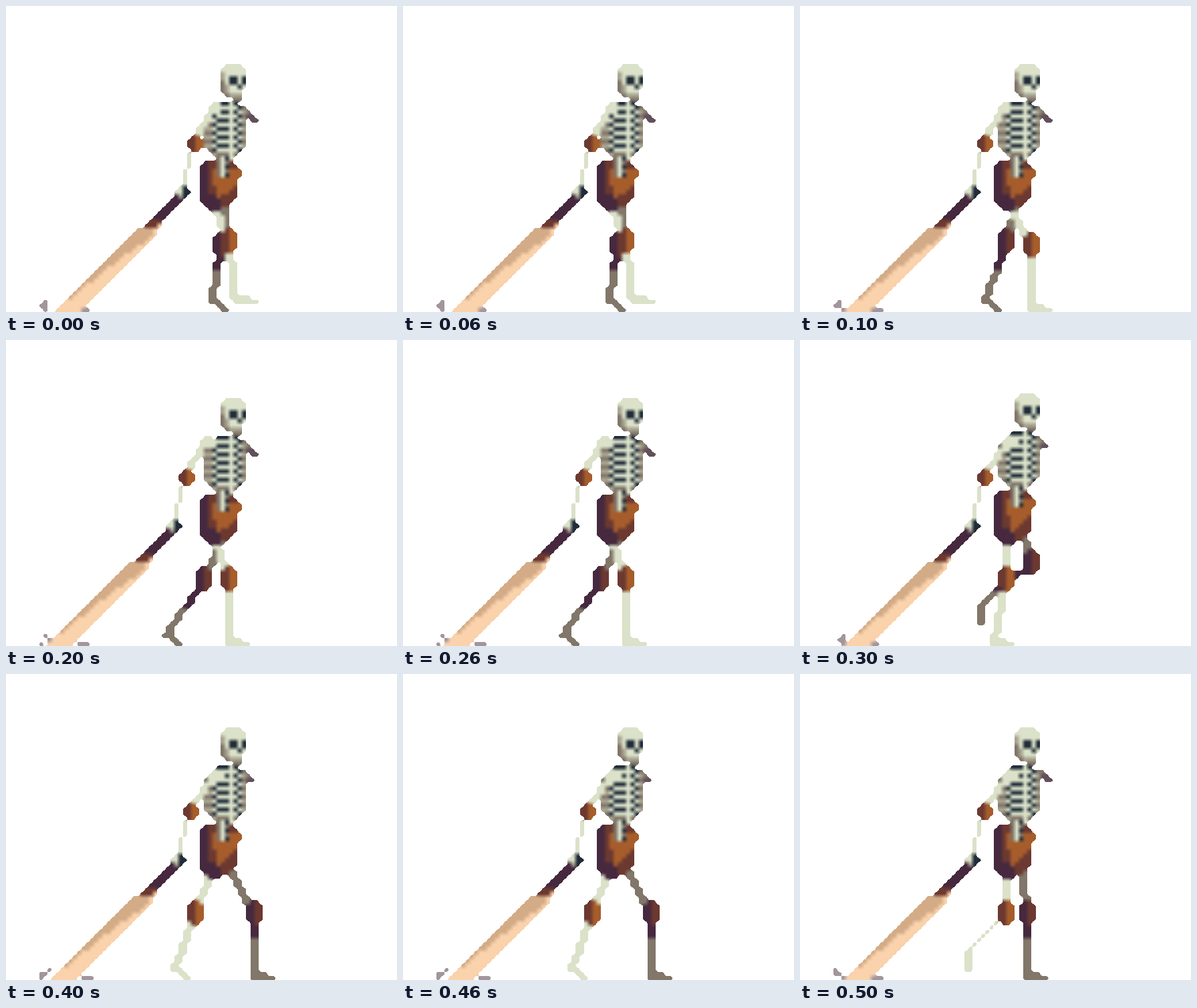
Recreate the animation shown at these times as an HTML page with a canvas. Size 585 by 459 pixels, loop 600 ms.

```html
<!DOCTYPE html>
<html lang="en">
<head>
<meta charset="utf-8">
<title>Skeleton walk</title>
<style>
html, body { margin: 0; width: 100%; height: 100%; overflow: hidden; background: #fff; }
canvas { display: block; }
</style>
</head>
<body>
<canvas id="stage" width="585" height="459"></canvas>
<script>
const BONE = '#dbe2c9', MID = '#aaa693', GREY = '#82776a', DARK = '#222d39';
const PLUM = '#46293f', BROWN = '#6c3931', RUST = '#a65d2b';
const STEEL = '#fad2ac', STEEL_SHADE = '#d3ac87', DUST = '#a3969c';
const CELL = 6.32, LEFT = -1.24, TOP = -2.2;
const COLS = 96, ROWS = 76, STEP = 100, POSES = 6;

// Figures are drawn on a coarse grid, then enlarged with smooth colours and hard edges
const grid = Object.assign(document.createElement('canvas'), { width: COLS, height: ROWS });
const pen = grid.getContext('2d');

function dot(x, y, color, w = 1, h = 1) {
  pen.fillStyle = color;
  pen.fillRect(x, y, w, h);
}

function shifted(x, y, draw) {
  pen.save();
  pen.translate(x, y);
  draw();
  pen.restore();
}

function inside(px, py, pts) {
  let hit = false;
  pts.forEach(([x, y], i) => {
    const [u, v] = pts.at(i - 1);
    if (y > py !== v > py && px < x + (u - x) * (py - y) / (v - y)) hit = !hit;
  });
  return hit;
}

// paint is a colour, or a rule that picks one for each cell
function shape(pts, paint) {
  for (let y = 0; y < ROWS; y++) {
    for (let x = 0; x < COLS; x++) {
      if (inside(x + .5, y + .5, pts)) dot(x, y, paint.call ? paint(x, y) : paint);
    }
  }
}

function line([x0, y0], [x1, y1], w, paint) {
  const n = Math.ceil(Math.max(Math.abs(x1 - x0), Math.abs(y1 - y0), 1));
  for (let i = 0; i <= n; i++) {
    const x = Math.floor(x0 + (x1 - x0) * i / n - w / 2 + .5);
    const y = Math.floor(y0 + (y1 - y0) * i / n);
    dot(x, y, paint.call ? paint(x, y) : paint, w);
  }
}

// Rounded guard, darker on its left half
function pad(x, y, half, tall, dark, light) {
  for (let r = 0; r < tall; r++) {
    const w = r === 0 || r === tall - 1 ? half - 1 : half;
    const row = Math.floor(y - tall / 2 + r), mid = Math.floor(x);
    dot(mid - w, row, dark, w);
    dot(mid, row, light, w);
  }
}

function head() {
  shape([[53, 14], [56, 14], [57, 15], [57, 20], [56, 21], [56, 22], [53, 22], [51, 20], [51, 16]], (x, y) => {
    const shade = y - 16 - (x - 51) * 3;
    return x > 53 || shade < 0 ? BONE : shade < 2 ? MID : GREY;
  });
  dot(53, 17, DARK, 2, 2);
  dot(56, 17, DARK, 1, 2);
  dot(55, 19, DARK);
  dot(53, 21, MID, 3);
  dot(54, 22, GREY, 2);
}

// Slanted ribs alternate with gaps on both sides of the spine
function rib(x, y) {
  if (x === 53) return BONE;
  const gap = x < 53 ? (y - Math.floor((x - 47) / 3)) % 2 === 0 : (y + Math.floor((x - 53) / 2)) % 2 === 1;
  const rim = x < 49 || x > 55 || y > 34;
  if (gap) return rim ? GREY : DARK;
  return rim ? MID : BONE;
}

function torso() {
  shape([[51, 23], [55, 23], [57, 26], [57, 33], [56, 35], [54, 37], [50, 37], [47, 33], [47, 27]], rib);
  for (let y = 36; y < 41; y++) {
    dot(50, y, GREY);
    dot(51, y, BONE);
    dot(52, y, y % 2 ? GREY : DARK);
  }
}

function pelvis(lift) {
  const raise = pts => pts.map(([x, y]) => [x, y < 44 ? y - lift : y]);
  shape(raise([[48, 37], [53, 37], [56, 39], [56, 41], [55, 42], [55, 46], [52, 48], [50, 49], [48, 49], [46, 46], [46, 39]]),
    (x, y) => x < 48 || x + 44 < y * 2 + 4 && x < 51 ? PLUM : BROWN);
  shape(raise([[49, 39], [51, 40], [56, 39], [55, 43], [52, 45], [50, 46]]), RUST);
}

// A leg pose holds knee x, knee y, ankle x, ankle y and how far the toe drops
const near = {
  hip: [49, 46], pad: [BROWN, RUST],
  thigh: (x, y) => y < 48 ? PLUM : BONE,
  shin: () => BONE,
  poses: [[53, 56, 54.5, 70, 0], [55, 57, 55, 72, 0], [53.5, 57, 53, 72, 0],
    [49, 57, 46, 72, 0], [45, 57, 40, 70, 2], [49, 57, 39.5, 66, 4]]
};
const far = {
  hip: [52.5, 45], pad: [PLUM, BROWN],
  thigh: (x, y) => y < 47 ? BROWN : GREY,
  shin: (x, y, knee) => y < knee + 6 ? PLUM : GREY,
  poses: [[51, 57, 49, 70, 2], [49, 56.5, 44, 70, 2], [47, 57.5, 38, 70, 2],
    [55, 53.5, 43, 63, 4], [59, 57, 59, 72, 0], [54, 57, 54, 72, 0]]
};

function leg(kind, i) {
  const [kx, ky, ax, ay, drop] = kind.poses[i];
  const knee = [kx, ky], ankle = [ax, ay];
  const thin = kind === near && Math.abs(ax - kx) > ay - ky;
  const skin = (x, y) => kind.shin(x, y, ky);
  line(kind.hip, knee, 2, kind.thigh);
  line(knee, ankle, thin ? 1 : 2, skin);
  line(ankle, [ax + 4 - drop * drop / 4, ay + drop], 2, skin);
  if (!drop) line([ax, ay - 1], [ax + 2, ay - 1], 2, skin);
  pad(kx, ky, 2, 6, ...kind.pad);
}

function arm(swing, shoulderX) {
  const elbow = [44.5 - swing, 32.5];
  pad(shoulderX, 25, 2, 3, BONE, BONE);
  line([shoulderX - .5, 25], elbow, 2, BONE);
  line(elbow, [42 - swing, 43], 1, BONE);
  pad(45 - swing, 33, 2, 4, BROWN, RUST);
}

function sword() {
  shape([[32, 53], [37, 50.5], [37, 52], [35, 55.5], [18, 72.5], [17, 75], [10, 75]], STEEL);
  shape([[32, 53], [36.5, 51], [34.7, 55], [26, 61.3], [15, 70], [13, 72]], STEEL_SHADE);
  line([42.5, 44.5], [34.5, 52.5], 3, x => x < 35 ? BROWN : PLUM);
  pad(42.5, 44.5, 2, 3, BONE, DARK);
  dot(41, 45, MID);
}

// Specks kicked up on both sides of the dragged blade
function dust(i) {
  let seed = i + 3;
  const random = () => (seed = seed * 16807 % 2147483647) / 2147483647;
  random();
  for (let k = 0; k < 5; k++) {
    const x = k < 3 ? 8 + random() * 3 : 17 + random() * 3;
    dot(Math.floor(x), k < 3 ? 70 + k : 72, DUST, 1 + k % 2);
  }
}

function figure(i) {
  const lift = i < 3 ? 0 : 1;
  const swing = i < 3 ? i : 1;
  const tip = lift ? [i < 5 ? 57.5 : 58.5, 25.5] : [58.5, 27.5];
  dust(i);
  line([55.5, 24 - lift], tip, 2, x => x > 56 ? '#63505a' : GREY);
  leg(far, i);
  leg(near, i);
  pelvis(lift);
  shifted(0, -lift, () => { torso(); head(); });
  arm(swing, lift ? 50 : 50 - swing);
  shifted(-swing, 0, sword);
}

const stage = document.getElementById('stage');
const view = stage.getContext('2d', { willReadFrequently: true });
view.imageSmoothingQuality = 'low';

function render(i) {
  pen.clearRect(0, 0, COLS, ROWS);
  figure(i);
  view.clearRect(0, 0, stage.width, stage.height);
  view.drawImage(grid, LEFT, TOP, COLS * CELL, ROWS * CELL);
  const image = view.getImageData(0, 0, stage.width, stage.height);
  for (let p = 3; p < image.data.length; p += 4) image.data[p] = image.data[p] > 127 ? 255 : 0;
  return image;
}

const poses = Array.from({ length: POSES }, (_, i) => render(i));
const start = performance.now();
function play(now) {
  const i = Math.floor(Math.max(0, now - start) / STEP) % POSES;
  view.putImageData(poses[i], 0, 0);
  requestAnimationFrame(play);
}
play(start);
</script>
</body>
</html>
```
